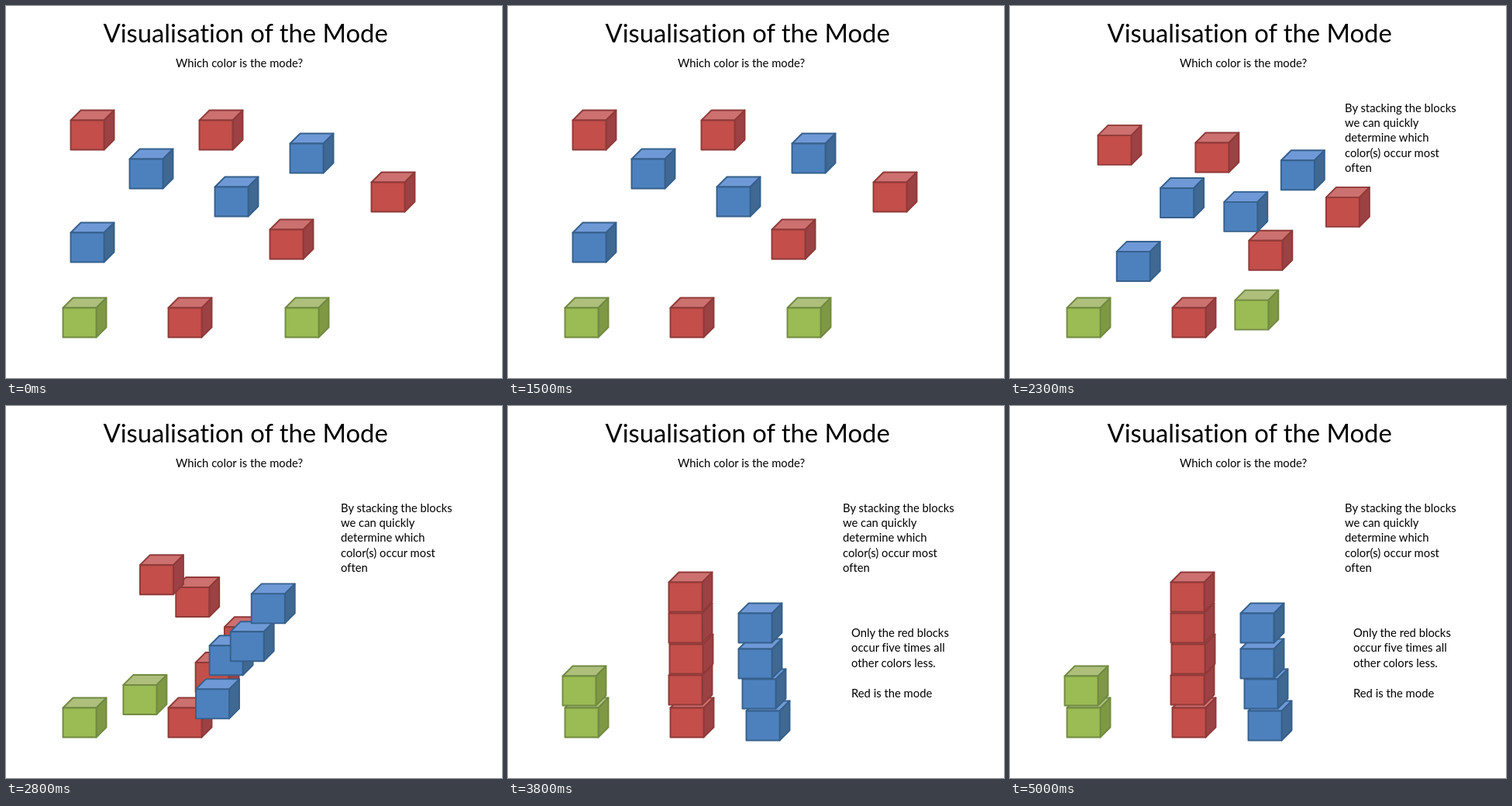
Recreate the animation shown at these times as an HTML page. Size 640 by 480 pixels, loop 5.1 s.

```html
<!DOCTYPE html>
<html lang="en">
<head>
<meta charset="utf-8">
<title>Visualisation of the Mode</title>
<style>
  html, body { margin: 0; width: 100%; height: 100%; overflow: hidden; background: #fff; }
  svg { display: block; width: 640px; height: 480px; }
  text { font: 14.8px Lato, Carlito, sans-serif; font-variant-ligatures: none; fill: #000; }
  .title { font-size: 32.8px; }
  .cube { stroke-width: 1.9; stroke-linejoin: round; }
  .red { stroke: #8f3a38; }
  .red .front { fill: #c34e4a; }
  .red .top { fill: #cc7070; }
  .red .side { fill: #9c4144; }
  .green { stroke: #718a42; }
  .green .front { fill: #9bbb54; }
  .green .top { fill: #aebf7c; }
  .green .side { fill: #7f9844; }
  .blue { stroke: #36608c; }
  .blue .front { fill: #4d81be; }
  .blue .top { fill: #6f99d6; }
  .blue .side { fill: #3f6892; }
</style>
</head>
<body>
<svg viewBox="0 0 640 480">
  <text class="title" x="125.5" y="47">Visualisation of the Mode</text>
  <text x="219" y="79">Which color is the mode?</text>
  <g id="cubes"></g>
  <g id="hint"></g>
  <g id="answer"></g>
</svg>
<script>
const LOOP = 5100, STEP = 100;
const START = 1676, DURATION = 1794;
const HINT_AT = 1700, ANSWER_AT = 3600;

// Front corner before and after stacking.
const cubes = [
  { color: 'red', from: [209, 389], to: [209, 389] },
  { color: 'red', from: [340, 288], to: [207, 347] },
  { color: 'red', from: [471, 227], to: [208, 307] },
  { color: 'red', from: [249, 147], to: [207, 267] },
  { color: 'red', from: [83, 147], to: [207, 227] },
  { color: 'green', from: [73, 389], to: [73, 389] },
  { color: 'green', from: [360, 389], to: [70, 348] },
  { color: 'blue', from: [83, 292], to: [307, 393] },
  { color: 'blue', from: [159, 197], to: [302, 352] },
  { color: 'blue', from: [269, 233], to: [297, 313] },
  { color: 'blue', from: [366, 177], to: [297, 267] }
];

function add(parent, tag, attrs) {
  const el = document.createElementNS('http://www.w3.org/2000/svg', tag);
  for (const key in attrs) el.setAttribute(key, attrs[key]);
  return parent.appendChild(el);
}

function addLines(id, x, y, lines) {
  const group = document.getElementById(id);
  lines.forEach((line, i) => {
    add(group, 'text', { x, y: y + i * 19.4 }).textContent = line;
  });
  return group;
}

const layer = document.getElementById('cubes');
// Half a pixel centres the outlines on the pixel grid.
layer.setAttribute('transform', 'translate(0.5 0.5)');
for (const cube of cubes) {
  cube.el = add(layer, 'g', { class: 'cube ' + cube.color });
  add(cube.el, 'path', { class: 'top', d: 'M0 0L13-13H56L43 0Z' });
  add(cube.el, 'path', { class: 'side', d: 'M43 0L56-13V25L43 38Z' });
  add(cube.el, 'path', { class: 'front', d: 'M0 0H43V38H0Z' });
}

const hint = addLines('hint', 432, 136.5, [
  'By stacking the blocks', 'we can quickly', 'determine which', 'color(s) occur most', 'often'
]);
const answer = addLines('answer', 443, 298, [
  'Only the red blocks', 'occur five times all', 'other colors less.', '', 'Red is the mode'
]);

// Constant acceleration to the midpoint, then constant deceleration.
function ease(u) {
  u = Math.min(1, Math.max(0, u));
  return u < 0.5 ? 2 * u * u : 1 - 2 * (1 - u) ** 2;
}

function draw(t) {
  const f = ease((t - START) / DURATION);
  for (const { el, from, to } of cubes) {
    const [x, y] = from.map((a, i) => a + (to[i] - a) * f);
    el.setAttribute('transform', `translate(${x} ${y})`);
  }
  hint.style.display = t >= HINT_AT ? '' : 'none';
  answer.style.display = t >= ANSWER_AT ? '' : 'none';
}

const origin = performance.now();
function tick() {
  const t = Math.max(0, performance.now() - origin) % LOOP;
  draw(Math.floor(t / STEP) * STEP);
  requestAnimationFrame(tick);
}
tick();
</script>
</body>
</html>
```
